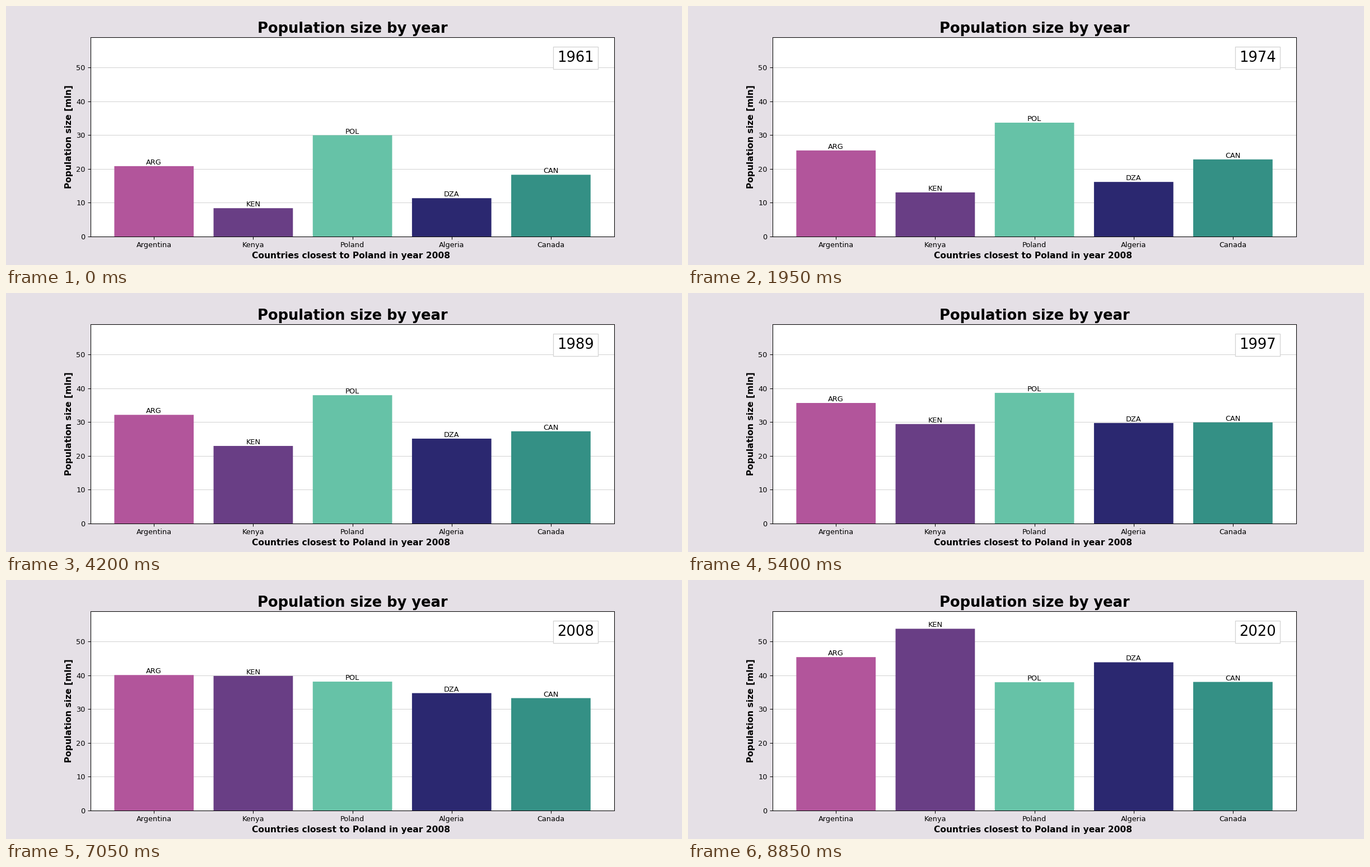
A matplotlib script that plays this animation: 1207 px wide and 464 px high, repeating every 9000 ms.

```python
import numpy as np
import matplotlib.pyplot as plt
from matplotlib.animation import FuncAnimation

WIDTH, HEIGHT, DPI = 1207, 464, 92.8
FIRST, LAST = 1961, 2020
STEP_MS = 150

# Population in millions at a few key years, joined by smooth curves
KEY_YEARS = np.array([1961, 1974, 1983, 1989, 1997, 2008, 2020])
COUNTRIES = [
    ("Argentina", "ARG", "#b2559b",
     [20.82, 25.46, 29.26, 32.15, 35.66, 40.08, 45.38]),
    ("Kenya", "KEN", "#693e85",
     [8.38, 13.05, 18.42, 22.95, 29.43, 39.82, 53.77]),
    ("Poland", "POL", "#66c2a7",
     [29.96, 33.68, 36.57, 37.96, 38.65, 38.13, 37.95]),
    ("Algeria", "DZA", "#2b2870",
     [11.34, 16.15, 21.10, 25.11, 29.74, 34.73, 43.85]),
    ("Canada", "CAN", "#349085",
     [18.27, 22.81, 25.37, 27.28, 29.91, 33.25, 38.04]),
]


def hermite(x, xs, ys):
    """Cubic curve through the points, with slopes taken from neighbours."""
    slopes = np.gradient(ys, xs, edge_order=2)
    i = min(np.searchsorted(xs, x, side="right") - 1, len(xs) - 2)
    width = xs[i + 1] - xs[i]
    t = (x - xs[i]) / width
    ease = t * t * (3 - 2 * t)
    bend = t * (1 - t) * (slopes[i] * (1 - t) - slopes[i + 1] * t)
    return ys[i] + (ys[i + 1] - ys[i]) * ease + width * bend


plt.rcParams["font.family"] = "DejaVu Sans"

# The small margin keeps the pixel size from rounding down
fig, ax = plt.subplots(
    figsize=((WIDTH + 0.01) / DPI, (HEIGHT + 0.01) / DPI),
    dpi=DPI, facecolor="#e5e0e6")

names, codes, colors, series = zip(*COUNTRIES)
bars = ax.bar(names, [values[0] for values in series], color=colors,
              snap=False)
labels = [ax.text(i, 0, code, ha="center", va="bottom")
          for i, code in enumerate(codes)]
year_box = ax.text(
    0.9257, 0.8748, str(FIRST), transform=ax.transAxes, fontsize=20,
    ha="center", va="baseline",
    bbox=dict(facecolor="white", edgecolor="lightgray", pad=5.3))

ax.set_xlim(-0.64, 4.64)
ax.set_ylim(0, 59)
ax.set_yticks(range(0, 60, 10))
ax.set_axisbelow(True)
ax.grid(axis="y", color="lightgray")
ax.set_title("Population size by year", fontsize=20, fontweight="bold")
# The trailing space sets the label slightly left of centre
ax.set_xlabel("Countries closest to Poland in year 2008 ",
              fontsize=12, fontweight="bold")
ax.set_ylabel("Population size [mln]", fontsize=12, fontweight="bold")


def update(frame):
    year = FIRST + frame
    for bar, label, values in zip(bars, labels, series):
        height = hermite(year, KEY_YEARS, values)
        bar.set_height(height)
        label.set_y(height)
    year_box.set_text(str(year))
    return [*bars, *labels, year_box]


anim = FuncAnimation(fig, update, frames=LAST - FIRST + 1,
                     interval=STEP_MS, repeat=True, repeat_delay=0)
plt.show()
```
